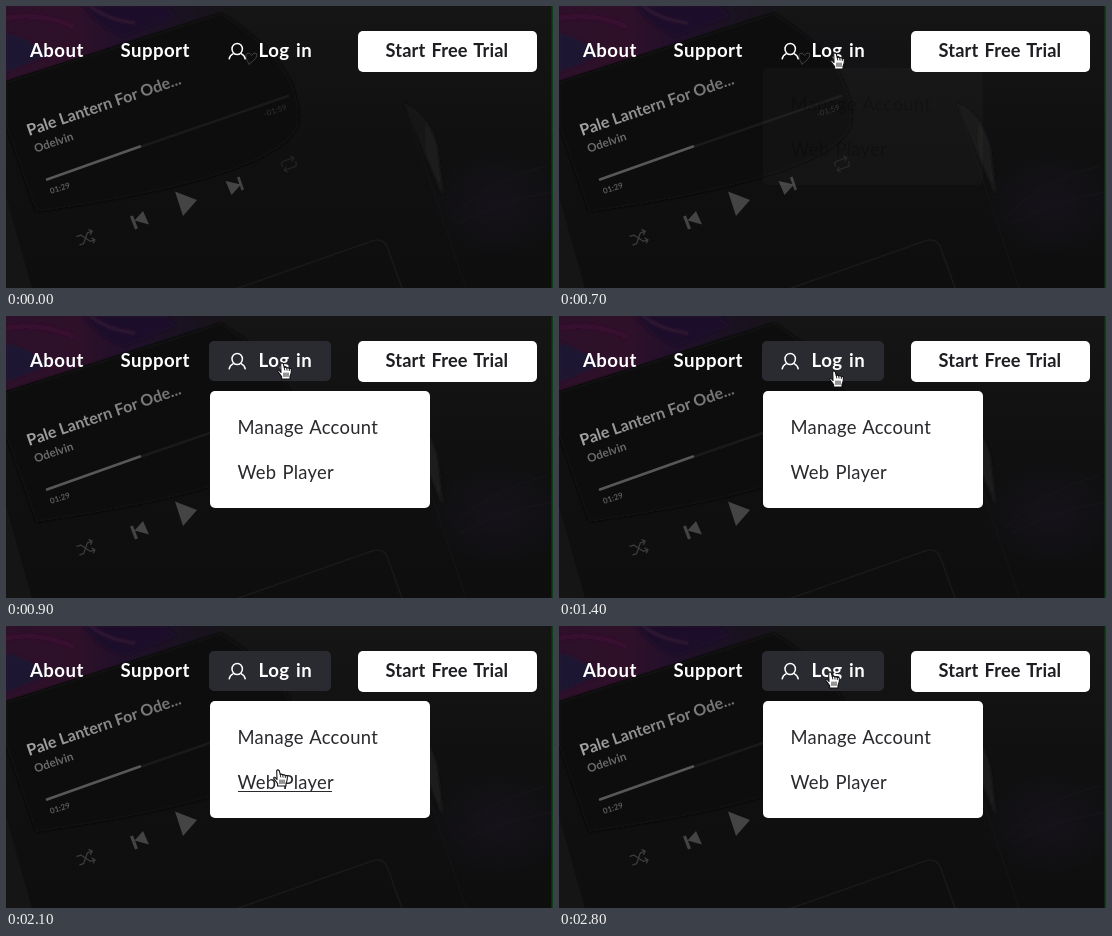
These frames come from a looping animation (547x282 px, 3000 ms). An HTML page:

```html
<!DOCTYPE html>
<html lang="en">
<head>
<meta charset="utf-8">
<title>Log in menu</title>
<style>
  html, body { margin: 0; width: 100%; height: 100%; overflow: hidden; background: #0e0e0f; }
  svg { display: block; width: 547px; height: 282px; }
  text { font-family: Lato, "Open Sans", sans-serif; }
  .nav { font-weight: 700; font-size: 18.6px; letter-spacing: .45px; word-spacing: 1.6px; fill: #fff; }
  .trial { font-weight: 700; font-size: 18.2px; letter-spacing: .15px; word-spacing: 1.6px; fill: #1e1e22; }
  .item { font-size: 18.4px; letter-spacing: .3px; word-spacing: 1px; fill: #2a2a2e; }
  .line { fill: none; stroke-linecap: round; stroke-linejoin: round; }
</style>
</head>
<body>
<svg viewBox="0 0 547 282">
  <defs>
    <linearGradient id="base" x2="0" y2="1">
      <stop offset="0" stop-color="#151516"/><stop offset=".5" stop-color="#101011"/><stop offset="1" stop-color="#0e0e0f"/>
    </linearGradient>
    <linearGradient id="glow" gradientUnits="userSpaceOnUse" x1="0" y1="0" x2="235" y2="0">
      <stop offset="0" stop-color="#2d1029"/><stop offset=".3" stop-color="#2e1029"/>
      <stop offset=".5" stop-color="#21102a"/><stop offset=".8" stop-color="#19121f"/><stop offset="1" stop-color="#151516"/>
    </linearGradient>
    <linearGradient id="title" x2="1" y2="0">
      <stop offset="0" stop-color="#a4a4a4"/><stop offset="1" stop-color="#6e6e6e"/>
    </linearGradient>
    <linearGradient id="wedge">
      <stop offset="0" stop-color="#121212"/><stop offset="1" stop-color="#20201f"/>
    </linearGradient>
    <radialGradient id="plum">
      <stop offset="0" stop-color="#16121a"/><stop offset="1" stop-color="#16121a" stop-opacity="0"/>
    </radialGradient>
    <filter id="soft" x="-20%" y="-20%" width="140%" height="140%"><feGaussianBlur stdDeviation="1.6"/></filter>
  </defs>

  <rect width="547" height="282" fill="url(#base)"/>
  <path d="M0 0H232L0 75Z" fill="url(#glow)"/>
  <g filter="url(#soft)">
    <path d="M0 27Q22 32 42 49L0 66Z" fill="#1b1233"/>
    <path d="M78 0Q92 22 118 30L170 10 160 0Z" fill="#1a1029"/>
    <path d="M84 0Q102 14 128 17" class="line" stroke="#301431" stroke-width="3"/>
    <path d="M0 12Q34 6 66 20" class="line" stroke="#3b1130" stroke-width="4"/>
  </g>
  <path d="M0 75L232 0 547 0V282H26L0 190Z" fill="url(#base)"/>
  <path d="M0 76L215 7Q300 60 292 120 270 172 30 206L0 120Z" fill="#0b0b0c" filter="url(#soft)"/>
  <path d="M0 190L26 282H0Z" fill="#151516"/>
  <path d="M398 97Q424 111 431 140L437 190Z" fill="url(#wedge)" filter="url(#soft)"/>
  <path class="line" d="M398 97L460 282" stroke="#151515"/>
  <ellipse cx="492" cy="198" rx="66" ry="52" fill="url(#plum)"/>
  <path class="line" d="M446 212Q478 176 540 160M452 218Q490 196 546 186" stroke="#18151b"/>
  <path class="line" d="M170 304L366 235Q378 231 382 243L396 282" stroke="#191919" stroke-width="1.5"/>
  <rect x="545.4" width="1.6" height="282" fill="#0b4013"/>

  <g transform="translate(23 130) rotate(-18.8)">
    <text font-size="16" font-weight="700" fill="url(#title)">Pale Lantern For Ode...</text>
    <text x="1" y="18" font-size="11.6" font-weight="700" fill="#6a6a6a">Odelvin</text>
  </g>
  <path class="line" d="M134 141L282 90" stroke="#1a1a1b" stroke-width="2.500"/>
  <path class="line" d="M41 173.500L134 140.500" stroke="#585858" stroke-width="2.500"/>
  <g font-size="8" font-weight="700">
    <text transform="translate(45 188) rotate(-18.6)" fill="#5c5c5c">01:29</text>
    <text transform="translate(259 111) rotate(-18.6)" fill="#282828">-01:59</text>
  </g>
  <g fill="#444">
    <path d="M169 185.500L191 194 177 210Z"/>
    <path d="M124 210.500L127 209.500 132 222.500 129 223.500ZM137 205L143 218.500 128.500 214.500Z"/>
    <path d="M219.500 175L235 178.500 225.500 189ZM231 171.500L233.500 170.500 238 183.500 235.500 184.500Z"/>
  </g>
  <g class="line" stroke="#3c3c3c" stroke-width="1.3" transform="translate(80 232) rotate(-18.6)">
    <path d="M-8-4.500H-4L3 4.500H7.500M-8 4.500H-4L3-4.500H7.500M5.500-7L8-4.500 5.500-2M5.500 2L8 4.500 5.500 7"/>
  </g>
  <g class="line" stroke="#232325" stroke-width="1.3" transform="translate(283 158) rotate(-18.6)">
    <path d="M-7 0V-2Q-7-4.500-4-4.500H6M4-7L6.500-4.500 4-2M7 0V2Q7 4.500 4 4.500H-6M-4 2L-6.500 4.500-4 7"/>
  </g>
  <path class="line" d="M243 58Q238 50 241 47.500 244 46 245.500 49.500 248 45.500 250.500 47.500 252.500 52 243 58Z" stroke="#404040"/>

  <rect id="button" x="203" y="25" width="122" height="40" rx="5" fill="#2a2a31"/>
  <g class="nav">
    <text x="24" y="51">About</text>
    <text x="114.500" y="51">Support</text>
    <text x="252.500" y="51">Log in</text>
  </g>
  <g class="line" stroke="#fff" stroke-width="1.5">
    <ellipse cx="231.200" cy="43" rx="5.200" ry="5.600"/>
    <path d="M223.200 52.800Q223.800 49.400 227 47.800M239.200 52.800Q238.600 49.400 235.400 47.800"/>
  </g>
  <rect x="352" y="25" width="179" height="41" rx="5" fill="#fff"/>
  <text class="trial" x="379.500" y="51">Start Free Trial</text>

  <g id="menu">
    <rect x="204" y="75" width="220" height="117" rx="5" fill="#fff"/>
    <text class="item" x="231.500" y="118">Manage Account</text>
    <text class="item" x="231.500" y="163">Web Player</text>
    <path id="line1" d="M232 120.500H374" stroke="#2a2a2e" stroke-width="1.2"/>
    <path id="line2" d="M232 165.500H326" stroke="#2a2a2e" stroke-width="1.2"/>
  </g>

  <path id="arrow" d="M.5.500V14.500L3.800 11.500 6 17 8.600 16 6.300 10.600H10.800Z" fill="#111" stroke="#fff" stroke-linejoin="round"/>
  <g id="hand" stroke-linejoin="round" stroke-linecap="round">
    <path d="M4 10.500L2.400 8.600Q.8 7.600.6 9.200L4.600 14.600V17H13V14.500Q14.600 11.500 14.400 7.600 13.800 5.800 12.300 6.800 11.600 5 9.800 6 8.800 4.600 7.300 5.500L6.200 1.700Q5 .1 3.700 1.600Z" fill="#fff" stroke="#111" stroke-width="1.100"/>
    <path d="M7.300 5.500L7.700 8M9.800 6L10 8.200M12.300 6.800V8.600M7 11V14.500M9 11V14.500M11 11V14.500" fill="none" stroke="#111" stroke-width=".9"/>
  </g>
</svg>
<script>
const LOOP = 3000;
const $ = id => document.getElementById(id);

// time, cursor, x, y, underlined item
const moves = [
  [0, "", 0, 0, 0],
  [200, "arrow", 287, 189, 0],
  [300, "arrow", 286, 164, 0],
  [400, "arrow", 283, 128, 0],
  [500, "arrow", 279, 90, 0],
  [600, "arrow", 276, 62, 0],
  [700, "hand", 271, 46, 0],
  [1400, "hand", 270, 54, 0],
  [1500, "hand", 269, 76, 0],
  [1600, "hand", 267, 96, 1],
  [1700, "hand", 267, 102, 1],
  [1900, "hand", 267, 112, 1],
  [2000, "hand", 267, 132, 0],
  [2100, "hand", 267, 143, 2],
  [2300, "hand", 267, 126, 0],
  [2400, "hand", 267, 88, 0],
  [2500, "hand", 267, 60, 0],
  [2700, "hand", 266, 51, 0],
  [2800, "hand", 266, 45, 0]
];
// time, menu opacity, menu shift, button opacity
const fades = [[0, 0, -14, 0], [700, .02, -13, .02], [800, .46, -7, .25], [900, 1, 0, 1]];

const at = (steps, t) => steps.findLast(s => s[0] <= t);

function draw(now) {
  const t = now % LOOP;
  const [, kind, x, y, item] = at(moves, t);
  const [, alpha, shift, fill] = at(fades, t);
  for (const id of ["arrow", "hand"]) {
    $(id).style.display = id === kind ? "" : "none";
    $(id).setAttribute("transform", `translate(${x} ${y})`);
  }
  for (const n of [1, 2]) $("line" + n).style.display = n === item ? "" : "none";
  $("menu").setAttribute("opacity", alpha);
  $("menu").setAttribute("transform", `translate(0 ${shift})`);
  $("button").setAttribute("opacity", fill);
}

function tick() {
  draw(performance.now());
  requestAnimationFrame(tick);
}
tick();
</script>
</body>
</html>
```
